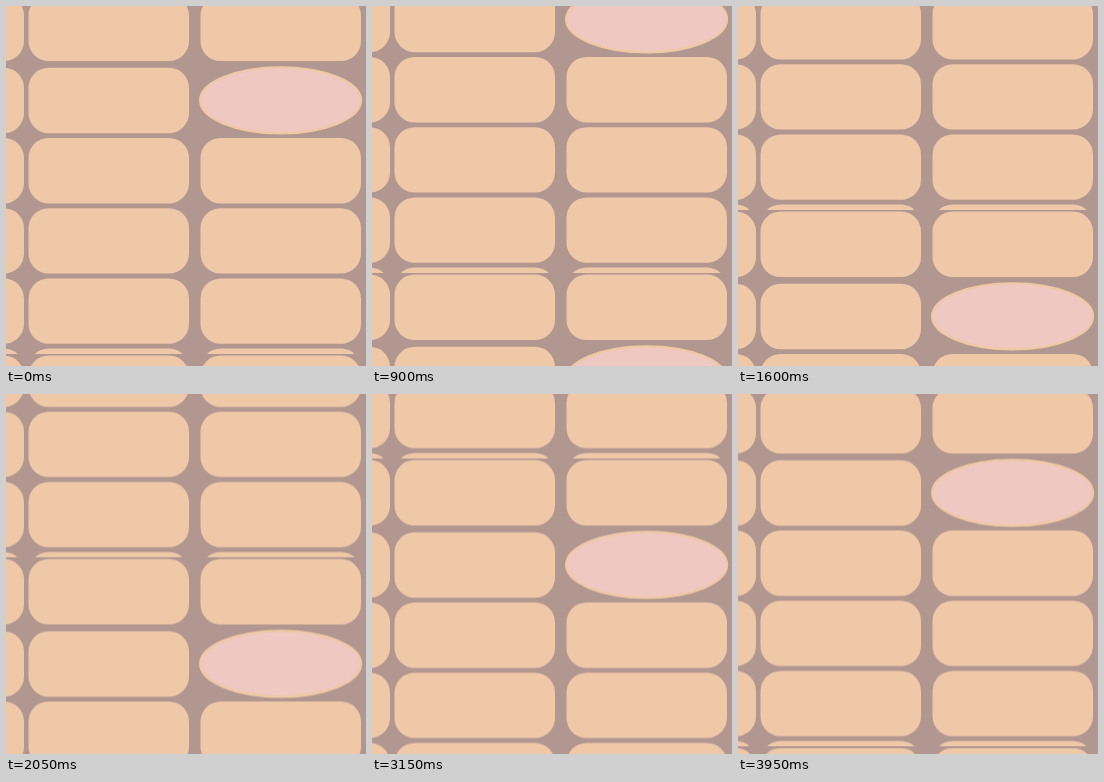
Animation, 360 px wide and 360 px high, one loop 4 s. Source, as an HTML page:

```html
<!DOCTYPE html>
<html lang="en">
<head>
<meta charset="utf-8">
<title>Scrolling tiles</title>
<style>
  html, body { margin: 0; width: 100%; height: 100%; overflow: hidden; background: #b29690; }
  svg { display: block; width: 360px; height: 360px; }
  .tile { fill: #efc8a8; }
  .oval { fill: #efc8c2; stroke: #efc8a4; stroke-width: 2.2px; }
  .wall { animation: scroll 4s steps(80) infinite; }
  @keyframes scroll { to { transform: translateY(-360px); } }
</style>
</head>
<body>
<svg viewBox="0 0 360 360">
  <defs>
    <clipPath id="band"><rect y="-12.5" width="360" height="360"/></clipPath>
    <rect id="cell" width="160.5" height="65.4" rx="20"/>
    <g id="pair">
      <use href="#cell" x="-142.5"/>
      <use href="#cell" x="22.5"/>
    </g>
    <g id="row">
      <use href="#pair"/>
      <use href="#cell" x="194.5"/>
    </g>
    <g id="panel" clip-path="url(#band)">
      <g class="tile">
        <use href="#row" y="-10.4"/>
        <use href="#pair" y="61.8"/>
        <use href="#row" y="132"/>
        <use href="#row" y="202.2"/>
        <use href="#row" y="272.4"/>
        <use href="#row" y="342.6"/>
      </g>
      <ellipse class="oval" cx="274.6" cy="94.3" rx="80.5" ry="33"/>
    </g>
  </defs>
  <g class="wall">
    <use href="#panel"/>
    <use href="#panel" y="360"/>
    <use href="#panel" y="720"/>
  </g>
</svg>
</body>
</html>
```
